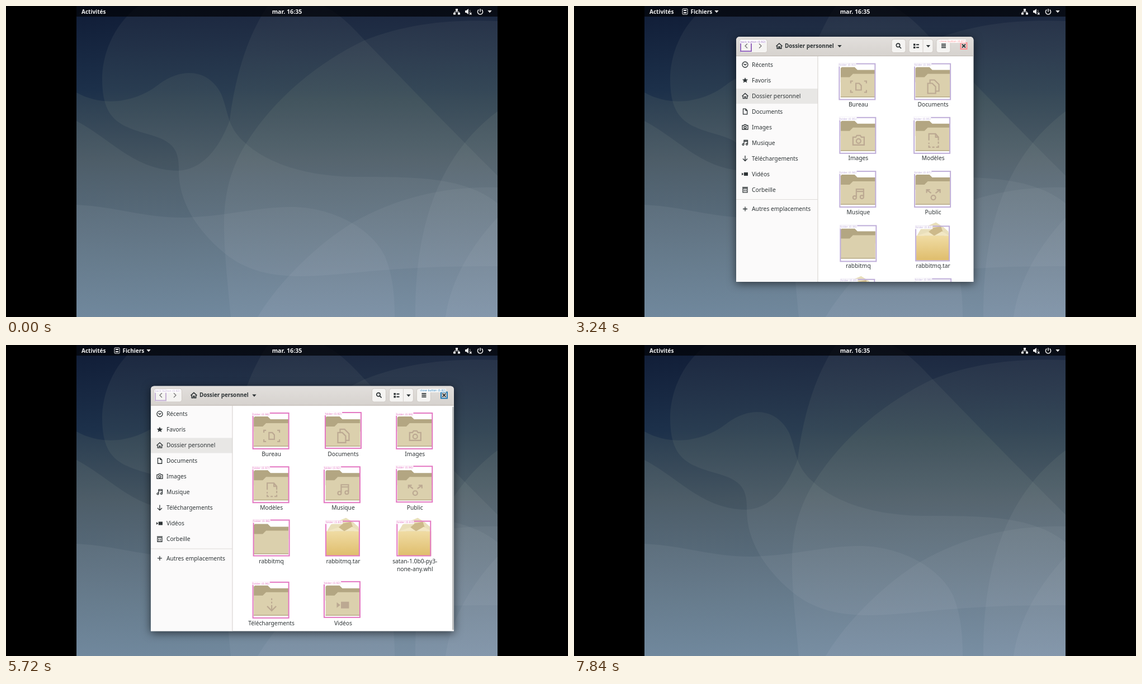
Animation of 1005x557 px, one loop 7880 ms. Source, as an HTML page with a canvas:

```html
<!DOCTYPE html>
<html lang="fr">
<head>
<meta charset="utf-8">
<title>Bureau</title>
<style>
html, body { margin: 0; width: 100%; height: 100%; overflow: hidden; background: #000; }
canvas { display: block; }
</style>
</head>
<body>
<canvas id="stage" width="1005" height="557"></canvas>
<script>
const LOOP = 7880, L = 126, R = 879, H = 557, INK = '#2e3436';
const screenCtx = document.getElementById('stage').getContext('2d');
let c = screenCtx;

const clamp = v => Math.min(1, Math.max(0, v));
const ease = (t, a, b) => { const p = clamp((t - a) / (b - a)); return p * p * (3 - 2 * p); };
const mix = (a, b, p) => a + (b - a) * p;
const hash = n => { const s = Math.sin(n * 12.9898 + 4.1) * 43758.5453; return s - Math.floor(s); };

function rect(x, y, w, h, fill, r = 0, stroke) {
  c.beginPath();
  c.roundRect(x, y, w, h, r);
  if (fill) { c.fillStyle = fill; c.fill(); }
  if (stroke) { c.strokeStyle = stroke; c.lineWidth = 1; c.stroke(); }
}
function disc(x, y, r, fill) {
  c.beginPath();
  c.arc(x, y, r, 0, 7);
  c.fillStyle = fill;
  c.fill();
}
function shape(d, fill, x = 0, y = 0, s = 1) {
  c.save();
  c.translate(x, y);
  c.scale(s, s);
  c.fillStyle = fill;
  c.fill(new Path2D(d));
  c.restore();
}
function line(d, color, x = 0, y = 0, s = 1, width = 1.3) {
  c.save();
  c.translate(x, y);
  c.scale(s, s);
  c.strokeStyle = color;
  c.lineWidth = width;
  c.stroke(new Path2D(d));
  c.restore();
}
function fade(y0, y1, stops) {
  const g = c.createLinearGradient(0, y0, 0, y1);
  stops.forEach(s => g.addColorStop(...s));
  return g;
}
function text(s, x, y, { size = 10.25, color = INK, align = 'left', bold = false, font = '"Noto Sans"' } = {}) {
  c.font = `${bold ? 'bold ' : ''}${size}px ${font}, sans-serif`;
  c.fillStyle = color;
  c.textAlign = align;
  c.fillText(s, x, y + size * .357);
}
const caret = (x, y, color = INK) => shape('M-3.7-2H3.7L0 2.2Z', color, x, y);

const ICONS = {
  clock: 'M-5 0a5 5 0 1 0 10 0a5 5 0 1 0-10 0M-2.5-1.5 0 .8 2.5-1.5',
  home: 'M-5.5 .5 0-4.5 5.5 .5M-3.7 0V4.7H-1V1.5H1V4.7H3.7V0',
  doc: 'M-3.5-4.8H1L3.7-2V4.8H-3.5ZM1-4.8V-2H3.7',
  camera: 'M-5-3H-2.5L-1.5-4.5H1.5L2.5-3H5V4H-5ZM-2 .5a2 2 0 1 0 4 0a2 2 0 1 0-4 0',
  music: 'M-2 3V-4.5H4.5V2M-2-2.5H4.5M-2 3a1.5 1.5 0 1 1-3 0a1.5 1.5 0 1 1 3 0M4.5 2.5a1.5 1.5 0 1 1-3 0a1.5 1.5 0 1 1 3 0',
  down: 'M0-5V4.5M-4 .5 0 4.5 4 .5',
  trash: 'M-4-2.5V4.8H4V-2.5ZM-5-4.3H5M-1.5-.5V3M1.5-.5V3',
  plus: 'M-4 0H4M0-4V4',
  search: 'M-4.2-1.2a3.2 3.2 0 1 0 6.4 0a3.2 3.2 0 1 0-6.4 0M1.3 1.2 4.6 4.5',
  desk: 'M-7-3V-5H-5M5-5H7V-3M-7 3V5H-5M5 5H7V3M-2.4-3H.6L2.4-1V3H-2.4Z',
  docs: 'M-5-3H-1L2 0V6H-5ZM-3-3V-6H1L5-2V4H2',
  template: 'M-4 0V-6H2L4.5-3V0M2-6V-3H4.5M-4 2V3.2M-4 4.5V6H-2.5M-1 6H1M2.5 6H4.5V4.5M4.5 1V3',
  share: 'M-2 3a2 2 0 1 0 4 0a2 2 0 1 0-4 0M-2-1-6-4M-6-1.2V-4H-3M2-1 6-4M6-1.2V-4H3',
  get: 'M0-6V-4.5M0-3V-1.5M0 0V5M-4 1 0 5 4 1'
};
const STAR = 'M0-5 1.5-1.6 5.2-1.4 2.4 1 3.3 4.6 0 2.6-3.3 4.6-2.4 1-5.2-1.4-1.5-1.6Z';
const VIDEO = 'M-2.2-3H5V3H-2.2ZM-6-2.5-2.8 0-6 2.5Z';

function icon(name, x, y, color = INK, s = 1, width = 1.3) {
  if (name === 'star') shape(STAR, color, x, y, s);
  else if (name === 'video') shape(VIDEO, color, x, y, s);
  else line(ICONS[name], color, x, y, s, width);
}

// Wallpaper, drawn once
const wall = Object.assign(document.createElement('canvas'), { width: 1005, height: H });
c = wall.getContext('2d');
rect(L, 0, R - L, H, fade(0, H, [[0, '#101c36'], [.27, '#1c304a'], [.5, '#394a58'], [1, '#557389']]));
const veil = fade(0, H, [[0, 'rgba(125,130,140,.1)'], [.3, 'rgba(157,170,140,.1)'],
  [.55, 'rgba(165,175,180,.1)'], [1, 'rgba(185,192,210,.1)']]);
[
  'M237 0C190 35 172 90 172 130C172 200 200 213 245 227C295 240 310 252 309 295C309 350 340 400 390 442C430 475 475 484 530 484C620 482 680 465 880 466V0Z',
  'M126 155C180 185 240 168 275 139C320 107 365 117 385 158C398 190 395 215 425 243C470 285 540 304 620 306C730 306 820 305 880 354V557H126Z',
  'M126 206C190 240 230 294 308 295C350 293 380 258 400 205C408 140 427 60 468 0H568C600 15 625 44 642 62C700 122 790 215 880 305V557H126Z',
  'M402 557C396 490 390 440 390 390C390 330 405 285 430 245C480 165 560 100 640 62C720 30 800 24 880 27V557Z',
  'M126 356C200 360 250 380 320 379C400 376 440 361 510 360C580 360 650 395 676 445C692 480 695 520 695 557H126Z',
  'M450 557C490 490 560 425 620 388C700 342 790 322 880 325V557Z',
  'M880 188C810 240 730 340 732 557H880Z',
  'M880 378C835 425 795 490 786 557H880Z'
].forEach(d => shape(d, veil));
c = screenCtx;

function tag(s, x, y, color) {
  c.font = '4.85px "DejaVu Sans", sans-serif';
  rect(x, y, c.measureText(s).width + 1, 6, '#fff');
  text(s, x + .5, y + 3, { size: 4.85, color, font: '"DejaVu Sans"' });
}
function box(x, y, w, h, color, label, tx = x, ty = y) {
  c.strokeStyle = color;
  c.lineWidth = 2;
  c.strokeRect(x + 1, y + 1, w - 2, h - 2);
  tag(label, tx, ty, color);
}
const score = (n, low = .9) => `(${(low + hash(n) * (.995 - low)).toFixed(2)})`;

function folder(x, y, s, glyph) {
  shape('M-29-27H-6L-1-22H31V0H-31V-25Z', '#b3a682', x, y, s);
  shape('M-31-9H-15L-9-15H31V27H-31Z', '#dbd0ad', x, y, s);
  shape('M-31 25.5H31V27H-31Z', '#b9ad89', x, y, s);
  if (glyph) icon(glyph, x + s, y + 8 * s, '#bca992', 2 * s, 1.1);
}
function pack(x, y, s) {
  shape('M-29-14-22-26-9-32 5-38 18-30 27-22 29-14Z', '#e9dfbb', x, y, s);
  shape('M-16-14 0-28 14-31 20-14Z', '#cdb98a', x, y, s);
  shape('M-29-14-8-21 2-14 16-22 29-14Z', '#f2e7c4', x, y, s);
  shape('M-30-14H29V30H-30Z', fade(-14, 30, [[0, '#f0dca4'], [1, '#dfbd6c']]), x, y, s);
}

const FILES = [['Bureau', 'desk'], ['Documents', 'docs'], ['Images', 'camera'], ['Modèles', 'template'],
  ['Musique', 'music'], ['Public', 'share'], ['rabbitmq', ''], ['rabbitmq.tar', 'pack'],
  ['satan-1.0b0-py3-none-any.whl', 'pack'], ['Téléchargements', 'get'], ['Vidéos', 'video']];
const SIZES = { 6: '10 éléments', 7: '159,1 Mo', 8: '93,3 ko' };
const PLACES = [['Récents', 'clock'], ['Favoris', 'star'], ['Dossier personnel', 'home'], ['Documents', 'doc'],
  ['Images', 'camera'], ['Musique', 'music'], ['Téléchargements', 'down'], ['Vidéos', 'video'], ['Corbeille', 'trash']];

function listView(x, y, step, color) {
  const head = { bold: true, color: '#9a9c9c', size: 9.9 }, grey = { color: '#a9aaa8' };
  text('Nom', x + 5, y + 8, head);
  caret(x + 164, y + 8, '#8b8e8f');
  text('Taille', x + 180, y + 8, head);
  text('Dernière modification', x + 249, y + 8, head);
  FILES.forEach(([name, glyph], i) => {
    const ry = y + 34.5 + i * 33.85;
    if (glyph === 'pack') pack(x + 22, ry + 1, .37);
    else folder(x + 22, ry + 1, .38, glyph);
    box(x + 10, ry - 11, 24, 25, color, 'folder ' + score(i + (step % 5) * 13, .97), x + 10, ry - 13);
    text(i === 8 ? 'satan-1.0b0-py3-none-a...' : name, x + 38, ry);
    text(SIZES[i] || '0 élément', x + 181, ry, grey);
  });
}
function iconView(x, y, w, step, color) {
  const cols = Math.max(2, Math.floor((w - 11) / 120)), cell = (w - 11) / cols;
  let ly = y + 86.5;
  FILES.forEach(([name, glyph], i) => {
    const col = i % cols, cx = x + 5.5 + (col + .5) * cell;
    if (i && !col) ly += 96.3 + (i > 8 && i - cols <= 8 ? 14 : 0);
    const isPack = glyph === 'pack', n = i * 7 + step * 31;
    const jx = Math.round(hash(n) * 2 - 1), jy = Math.round(hash(n + 3) * 2 - 1);
    if (isPack) pack(cx, ly - 40, 1);
    else folder(cx - .5, ly - 40, 1, glyph);
    const label = 'folder ' + score(n + 5, isPack ? .78 : .92);
    if (isPack) box(cx - 32 + jx, ly - 72 + jy, 62, 64, color, label);
    else box(cx - 34 + jx, ly - 74 + jy, 66, 66, color, label);
    const lines = i === 8 ? ['satan-1.0b0-py3-', 'none-any.whl'] : [name];
    lines.forEach((s, k) => text(s, cx, ly + k * 14, { align: 'center' }));
  });
}

const DRAG = [[5420, 290, 55], [6040, 226, 93], [6280, 180, 117], [6700, 166, 124], [6980, 164, 125]];
function dragged(t) {
  let i = 0;
  while (i < DRAG.length - 2 && t > DRAG[i + 1][0]) i++;
  const [a, b] = [DRAG[i], DRAG[i + 1]], p = clamp((t - a[0]) / (b[0] - a[0]));
  return [mix(a[1], b[1], p), mix(a[2], b[2], p)];
}
const maximised = t => ease(t, 4260, 4440) * (1 - ease(t, 4800, 4960));

// Start time, then colours of back button, folders and close button
const TINTS = [[0, '#d29a8c', '#8b4a4a', '#e058b8'], [2720, '#9467bd', '#bfaed9', '#ff8f92'],
  [4220, '#8c4b45', '#e377c2', '#a8625a'], [5540, '#c5b0d5', '#e377c2', '#1f77b4']];

function fileWindow(t) {
  const max = maximised(t);
  let [x, y] = dragged(t);
  x = mix(x, L, max);
  y = mix(y, 19, max);
  const w = mix(t < 4700 ? 424.5 : 542, R - L, max), h = mix(439, H - 19, max);
  const r = x + w, hy = y + 16.5, by = y + 35;
  const still = t > 3920 && t < 4220 ? 3919 : Math.min(t, 6979);
  const step = Math.floor(still / 120), grid = t >= 2720;
  const [, back, tint, close] = TINTS.filter(p => p[0] <= t).pop();
  const open = ease(t, 1480, 1640), gone = ease(t, 7580, 7800), zoom = mix(.85, 1, open) * mix(1, .8, gone);

  c.save();
  c.globalAlpha = open * (1 - gone);
  c.translate(x + w / 2, y + h / 2);
  c.scale(zoom, zoom);
  c.translate(-x - w / 2, -y - h / 2);
  const corners = max > .9 ? 0 : [6, 6, 0, 0];
  c.shadowColor = 'rgba(0,0,0,.6)';
  c.shadowBlur = 16;
  c.shadowOffsetY = 3;
  rect(x, y, w, h, '#fff', corners);
  c.shadowColor = 'transparent';
  c.beginPath();
  c.roundRect(x, y, w, h, corners);
  c.clip();

  c.save();
  c.beginPath();
  c.rect(x + 146, by, w - 146, h - 35);
  c.clip();
  if (grid) iconView(x + 146, by, w - 146, step, tint);
  else listView(x + 146, by, step, tint);
  if (t > 4960) rect(r - 2.5, by + 2, 2, h - 39, '#a3a5a5', 1);
  c.restore();

  rect(x, by, 146, h - 35, '#fbfafa');
  rect(x, y + 93, 146, 27, '#e8e7e5');
  rect(x + 145.5, by, 1, h - 35, '#d3cfcb');
  PLACES.forEach(([s, name], i) => {
    icon(name, x + 16, y + 50 + i * 28);
    text(s, x + 28, y + 50 + i * 28);
  });
  rect(x, y + 291, 146, 1, '#dfdcd9');
  icon('plus', x + 16, y + 308.5);
  text('Autres emplacements', x + 28, y + 308.5);

  rect(x, y, w, 35, fade(y, by, [[0, '#e2dfdc'], [1, '#d6d2ce']]));
  rect(x, by - 1, w, 1, '#bfb8b1');
  const button = (bx, bw) => rect(bx + .5, y + 4.5, bw - 1, 24, '#f5f4f2', 4, '#cfc9c4');
  button(x + 5, 51);
  line('M2-4-2 0 2 4', '#777', x + 18, hy);
  line('M-2-4 2 0-2 4', '#777', x + 43, hy);
  icon('home', x + 77, hy, INK, 1, 1.6);
  text('Dossier personnel', x + 87, hy, { bold: true, size: 9.8 });
  caret(x + 185, hy + .5);
  button(r - 147, 26);
  icon('search', r - 134, hy, INK, 1, 1.7);
  button(r - 116, 44);
  rect(r - 91, y + 5, 1, 23, '#d5d0cc');
  for (const dy of [-4, 1]) {
    rect(r - 107.5, hy + dy, 3.5, 3.5, INK);
    rect(r - 102.5, hy + dy + (grid ? .7 : 0), grid ? 5 : 3.5, grid ? 2 : 3.5, INK);
  }
  caret(r - 81, hy + .5);
  button(r - 67, 26);
  for (const dy of [-4, -1, 2]) rect(r - 57.5, hy + dy, 8, 1.7, INK);
  line('M-3-3 3 3M3-3-3 3', INK, r - 17.5, hy, 1, 1.8);

  if (t > 1640) {
    box(x + 7, y + 6, 21, 21, back, 'back button ' + score(step + 2, .84));
    box(r - 24, y + 10, 13, 13, close, 'close button ' + score(step + 9, .78), r - 61, y + 5);
  }
  c.restore();
}

function overview(t) {
  const p = ease(t, 300, 620) * (1 - ease(t, 1300, 1500));
  if (!p) return p;
  c.save();
  c.globalAlpha = p;
  const dim = c.createRadialGradient(505, 350, 20, 505, 330, 440);
  [[0, .42], [.35, .58], [.75, .84], [1, .94]].forEach(([o, a]) => dim.addColorStop(o, `rgba(4,6,8,${a})`));
  rect(L, 0, R - L, H, dim);
  rect(377.5, 37.5, 250, 25, '#2d3335', 4, '#6d7274');
  icon('search', 393, 50.5, '#d5d7d7', 1, 1.6);
  text('Rechercher…', 406, 50.5, { color: '#d0d2d2' });

  c.save();
  c.translate(26 * (1 - p), 0);
  rect(855.5, 81.5, 40, 460, 'rgba(44,50,53,.92)', 6, '#5a6063');
  c.drawImage(wall, L, 0, R - L, H, 862, 87, 78, 57);
  c.lineWidth = 3;
  c.strokeStyle = '#215d9c';
  c.strokeRect(860.5, 85.5, 81, 59);
  c.restore();

  c.translate(-60 * (1 - p), 0);
  rect(116.5, 101.5, 67, 419, 'rgba(44,50,53,.92)', 7, '#565c5f');
  if (t > 960) rect(131, 314, 46, 46, '#474d50', 4);
  disc(154, 131, 16, '#f58a2c');
  rect(141, 169, 27, 25, '#d8d8d4');
  rect(143, 218, 23, 31, '#e9e9e6', 6);
  rect(140, 268, 29, 35, '#1d84b0');
  rect(141, 320, 25, 34, '#5b93d6', 2, '#2f62a5');
  for (const y of [324, 338]) {
    rect(144, y, 19, 12, '#79aae4', 1, '#3f74b8');
    rect(150, y + 5, 7, 2, '#dce7f4');
  }
  line('M-6-6V-12Q0-17 6-12V-6', '#c9c9c6', 154, 389, 1, 2);
  shape('M-12-9H12L14 14H-14Z', '#dededb', 154, 388);
  disc(154, 391, 7, '#5d8cc4');
  for (let i = 0; i < 8; i++) {
    c.beginPath();
    c.arc(154, 440, 13, (i - .5) * Math.PI / 4, (i + .5) * Math.PI / 4);
    c.lineWidth = 9;
    c.strokeStyle = i % 2 ? '#f2f2f0' : '#d8344a';
    c.stroke();
  }
  for (let i = 0; i < 9; i++) disc(145 + i % 3 * 9, 483 + Math.floor(i / 3) * 9, 2.2, '#f2f2f2');
  if (t > 760) {
    box(135, 112, 37, 37, '#1f77b4', 'browser (0.98)');
    box(136, 164, 35, 34, '#ff7f0e', 'messenger (0.97)');
    box(136, 264, 36, 42, '#ffbb78', 'text (0.97)');
    box(139, 318, 29, 38, '#c5d2e4', 'folder (0.95)');
  }
  c.restore();
  return p;
}

function topBar(t, p) {
  const white = { color: '#f2f2f2', bold: true, size: 10 };
  rect(L, 0, R - L, 19, `rgba(2,4,7,${mix(.74, 1, Math.max(p, maximised(t)))})`);
  text('Activités', 135, 10, white);
  if (p) rect(L, 18, 61, 2, `rgba(52,104,164,${p})`);
  text('mar. 16:35', 502.5, 10, { ...white, size: 10.6, align: 'center' });
  if (t > 1420 && t < 7700) {
    rect(194, 5, 9, 10, null, 1, '#eee');
    rect(196, 7, 5, 2, '#eee');
    rect(196, 11, 5, 2, '#eee');
    text('Fichiers', 208.5, 10, white);
    caret(255, 10, '#eee');
    if (t < 2240) {
      c.beginPath();
      c.arc(268, 10, 3.5, t / 160 + 1, t / 160 + 5);
      c.lineWidth = 2;
      c.strokeStyle = '#777f86';
      c.stroke();
    }
  }
  shape('M-2-5H2V-1H-2ZM-6 2H-2V5.5H-6ZM2 2H6V5.5H2Z', '#eee', 806, 10);
  line('M0-1V.5M-4 2V.5H4V2', '#eee', 806, 10, 1, 1);
  shape('M-6-2H-4L0-5V5L-4 2H-6Z', '#eee', 827, 10);
  line('M2-3Q4 0 2 2', '#777', 827, 10);
  line('M2 2 5.5 5.5M5.5 2 2 5.5', '#eee', 827, 10);
  line('M-2.6-3.8A4.6 4.6 0 1 0 2.6-3.8M0-5.5V0', '#eee', 848, 10.5, 1, 1.5);
  caret(865, 10, '#eee');
}

function draw() {
  const t = performance.now() % LOOP;
  c.fillStyle = '#000';
  c.fillRect(0, 0, 1005, H);
  c.save();
  c.beginPath();
  c.rect(L, 0, R - L, H);
  c.clip();
  c.drawImage(wall, 0, 0);
  const p = overview(t);
  if (t > 1480 && t < 7800) fileWindow(t);
  topBar(t, p);
  c.restore();
  requestAnimationFrame(draw);
}
draw();
</script>
</body>
</html>
```
